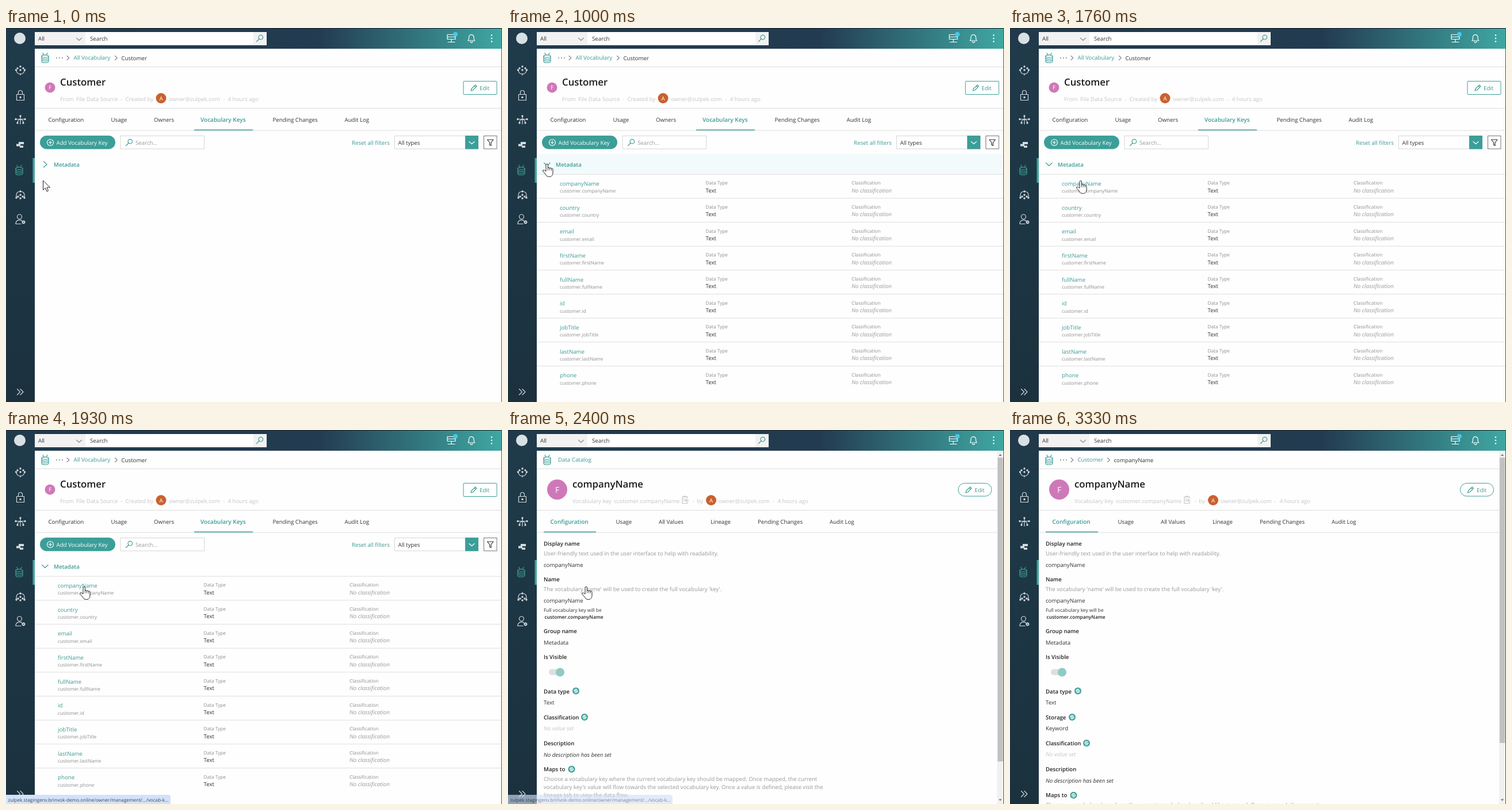
An HTML page that plays this animation: 862 px wide and 650 px high, repeating every 4.86 s.

```html
<!DOCTYPE html>
<html lang="en">
<head>
<meta charset="utf-8">
<title>Vocabulary keys</title>
<style>
html, body { margin: 0; width: 100%; height: 100%; overflow: hidden; background: #fefefe; }
svg { display: block; }
text { font: 9.7px "Open Sans", "Noto Sans", sans-serif; fill: #333; text-rendering: geometricPrecision; }
.title { font-size: 16.8px; font-weight: 600; fill: #1c1c1c; }
.label { font-size: 9.65px; font-weight: 600; fill: #222; }
.tab { font-size: 10px; font-weight: 600; fill: #3c9a94; }
.link { fill: #3c9a94; }
.faint { fill: #c6c6c6; }
.hint { fill: #999; }
.small { font-size: 8.25px; fill: #8c8c8c; }
.it { font-style: italic; }
.white { fill: #fff; }
.mid { text-anchor: middle; }
.rule { stroke: #dedede; }
.teal { stroke: #3c9e98; }
.ln { fill: none; stroke-width: 1.2; stroke-linecap: round; stroke-linejoin: round; }
.pale { stroke: #d3dade; }
.gray { stroke: #8a8a8a; }

/* scene switches, one 4860 ms loop */
.closed, .rows, .list, .crumb-list, .load, .page, .early, .late, .badge, .hover, .arrow, .hand {
  animation: 4860ms step-end infinite;
}
.closed { animation-name: closed; }
.rows { animation-name: rows; }
.list { animation-name: list; }
.crumb-list { animation-name: crumb; }
.load { animation-name: load; }
.page { animation-name: page; }
.early { animation-name: early; }
.late { animation-name: late; }
.badge { animation-name: badge; }
.hover { animation-name: hover; }
.arrow { animation-name: arrow; }
.hand { animation-name: hand; }
@keyframes closed { 0% { visibility: visible } 20.576%, 100% { visibility: hidden } }
@keyframes rows { 0% { visibility: hidden } 20.576% { visibility: visible } 44.444%, 100% { visibility: hidden } }
@keyframes list { 0% { visibility: visible } 44.444%, 100% { visibility: hidden } }
@keyframes crumb { 0% { visibility: visible } 49.177%, 100% { visibility: hidden } }
@keyframes load { 0% { visibility: hidden } 44.444% { visibility: visible } 49.177%, 100% { visibility: hidden } }
@keyframes page { 0% { visibility: hidden } 49.177%, 100% { visibility: visible } }
@keyframes early { 0% { visibility: hidden } 49.177% { visibility: visible } 50.72%, 100% { visibility: hidden } }
@keyframes late { 0% { visibility: hidden } 50.72%, 100% { visibility: visible } }
@keyframes badge { 0% { visibility: visible } 44.444% { visibility: hidden } 49.177%, 100% { visibility: visible } }
@keyframes hover { 0% { visibility: hidden } 14.4% { visibility: visible } 34.3%, 100% { visibility: hidden } }
@keyframes arrow { 0% { visibility: visible } 12.963%, 100% { visibility: hidden } }
@keyframes hand { 0% { visibility: hidden } 12.963% { visibility: visible } 68.519%, 100% { visibility: hidden } }

.move { animation: move 4860ms cubic-bezier(.25, .46, .45, .94) infinite; }
@keyframes move {
  0%, 12.963% { transform: translate(65px, 264.5px) }
  17.695%, 32.099% { transform: translate(68px, 236px) }
  39.712%, 100% { transform: translate(136px, 272px) }
}
.status { animation: status 4860ms linear infinite; }
@keyframes status {
  0%, 38.68% { opacity: 0 }
  38.69%, 47.94% { opacity: 1 }
  52.058%, 100% { opacity: 0 }
}
.spoke { stroke: #47a296; stroke-width: 6; stroke-linecap: round; animation: spoke 1215ms linear infinite; }
@keyframes spoke { from { opacity: 1 } to { opacity: 0 } }
</style>
</head>
<body>
<svg width="862" height="650" viewBox="0 0 862 650">
  <defs>
    <linearGradient id="bar" gradientUnits="userSpaceOnUse" x1="0" x2="862" y1="0" y2="0">
      <stop offset="0" stop-color="#203a4b"/>
      <stop offset=".63" stop-color="#233b50"/>
      <stop offset="1" stop-color="#3fa8a3"/>
    </linearGradient>
    <linearGradient id="side" x1="0" x2="0" y1="0" y2="1">
      <stop offset="0" stop-color="#1f3a49"/>
      <stop offset="1" stop-color="#1b313e"/>
    </linearGradient>
    <g id="stack" class="ln teal">
      <ellipse cy="-3" rx="6" ry="2.2"/>
      <path d="M-6-3V6c0 3 12 3 12 0V-3M-6 0c0 3 12 3 12 0M-6 3c0 3 12 3 12 0M-2.5-5.5-4-8.5M2.5-5.5 4-8.5"/>
    </g>
    <g id="lens" class="ln">
      <circle cx="1.8" cy="-1.8" r="3.8"/><path d="M-1 1-5.5 5.5"/>
    </g>
    <path id="pencil" class="ln teal" d="M-5 5-4 1.5 2.7-5 5-2.7-1.5 4zM1-3.3 3.3-1"/>
    <path id="next" class="ln gray" d="M-2-3.5 1.8 0-2 3.5"/>
    <g id="more" fill="#777"><circle cx="-5" r=".9"/><circle r=".9"/><circle cx="5" r=".9"/></g>
    <g id="info">
      <circle r="6" fill="#3c9e98"/>
      <g class="ln" stroke="#fff" stroke-width=".9"><circle r="1.3"/><path d="M-3 1A3.2 3.2 0 0 1 2-2.5M3-1A3.2 3.2 0 0 1-2 2.5"/></g>
    </g>
  </defs>

  <rect width="862" height="650" fill="#fefefe"/>
  <rect y="36" width="50" height="614" fill="url(#side)"/>
  <rect width="862" height="36" fill="url(#bar)"/>

  <!-- top bar -->
  <circle cx="24" cy="18" r="10" fill="#d9e0e4"/>
  <rect x="50" y="7" width="403" height="23" fill="#f2f2f2"/>
  <rect x="138" y="7" width="292" height="23" fill="#fff"/>
  <text x="56" y="21.5" fill="#555">All</text>
  <path class="ln gray" d="M122.500 17.500l4.500 4 4.500-4"/>
  <text x="146" y="22">Search</text>
  <use href="#lens" x="441" y="18" class="teal"/>
  <g class="ln" stroke="#fff">
    <path d="M767 11.500h14v4h-14zM767 15.500h14v4h-14zM774 19.500v4M768 24.500h12"/>
    <path d="M803 22c2-2 1.500-4 1.500-6a4.300 4.300 0 0 1 8.600 0c0 2-.4 4 1.600 6zM807 23.500a2 1.800 0 0 0 4 0"/>
  </g>
  <circle class="badge" cx="781" cy="11" r="4" fill="#45c8ea"/>
  <g fill="#fff"><circle cx="844" cy="12.500" r="1.300"/><circle cx="844" cy="18" r="1.300"/><circle cx="844" cy="23.500" r="1.300"/></g>

  <!-- side bar -->
  <g class="ln pale">
    <path d="M18 74c1 8 13 8 14 0M25 79v3"/>
    <path d="M18.500 115.500h13v10h-13zM21.500 115v-3a3.500 3.500 0 0 1 7 0v3"/>
    <path d="M17 158.500h16M25 153v14M20 165c0-4 2-6 5-6s5 2 5 6"/>
    <path d="M18 290c0-8 14-8 14 0M18 290v4M32 290v4"/>
    <circle cx="23.500" cy="328" r="4"/>
    <path d="M17 340.500c0-8 9-8 11-5M17 340.500h9"/>
    <circle cx="30.500" cy="337.500" r="2" stroke-width="2" stroke-dasharray="1.200 .6"/>
    <path d="M19.500 627.500l5 5-5 5M25 627.500l5 5-5 5"/>
  </g>
  <g id="dots" fill="#d3dade"></g>
  <path d="M22 198h9v4h-9zM18 201.500h7v4h-7zM24 204.500h6v3.500h-6z" fill="#d3dade"/>
  <use href="#stack" x="23" y="247"/>
  <rect x="46.500" y="226" width="3.500" height="43" fill="#3fa59f"/>

  <path class="rule" d="M50 67.500H861"/>
  <use href="#stack" x="68" y="52"/>

  <g class="crumb-list">
    <use href="#more" x="93" y="52"/>
    <use href="#next" x="108" y="52"/>
    <text class="link" x="117.500" y="55">All Vocabulary</text>
    <use href="#next" x="191.500" y="52"/>
    <text x="200.500" y="55.500">Customer</text>
  </g>

  <!-- vocabulary with its keys -->
  <g class="list">
    <circle cx="76.500" cy="103.500" r="9" fill="#cf78b9"/>
    <text class="white mid" x="76.500" y="107.300">F</text>
    <text class="title" x="94" y="100">Customer</text>
    <g class="meta">
      <text class="faint" x="94" y="126.500">From</text>
      <text class="faint" x="122" y="126.500">File Data Source</text>
      <text class="faint" x="199" y="126.500">-</text>
      <text class="faint" x="207.500" y="126.500">Created by</text>
      <circle cx="269.500" cy="122" r="9" fill="#c9612f"/>
      <text class="white mid" x="269.500" y="126">A</text>
      <text class="faint" x="283" y="126.500">owner@zulpek.com</text>
      <text class="faint" x="377.500" y="126.500">-</text>
      <text class="faint" x="385.500" y="126.500">4 hours ago</text>
    </g>
    <rect x="795" y="92.500" width="58" height="23" rx="1" fill="#fff" class="teal"/>
    <use href="#pencil" x="813" y="104"/>
    <text class="link" x="823" y="107.800">Edit</text>
    <path class="rule" d="M50 139.500H861M50 178H861"/>
    <text x="73.500" y="163">Configuration</text>
    <text x="182.500" y="163">Usage</text>
    <text x="257" y="163">Owners</text>
    <text class="tab" x="338" y="163">Vocabulary Keys</text>
    <text x="463.500" y="163">Pending Changes</text>
    <text x="588.500" y="163">Audit Log</text>
    <path class="teal" stroke-width="1.500" d="M327 177.300H429"/>

    <rect x="59" y="187" width="131" height="23.500" rx="11.700" fill="#3c9e98"/>
    <g class="ln" stroke="#fff"><circle cx="77" cy="199" r="5.500"/><path d="M74.200 199h5.600M77 196.200v5.600"/></g>
    <text class="white" x="87.500" y="202.500">Add Vocabulary Key</text>
    <rect x="199" y="187.500" width="145.500" height="22.500" fill="#fff" stroke="#d6d6d6"/>
    <use href="#lens" x="214" y="199" class="teal"/>
    <text class="hint" x="225" y="202.500">Search...</text>
    <text class="link" x="601" y="202.500">Reset all filters</text>
    <rect x="675.500" y="187.500" width="145" height="22.500" fill="#fff" stroke="#d6d6d6"/>
    <text x="681.500" y="203">All types</text>
    <rect x="798" y="187" width="23" height="23.500" fill="#3c9e98"/>
    <path class="ln" stroke="#fff" d="M805 197.500l4.500 4 4.500-4"/>
    <rect x="830.500" y="187.500" width="22.500" height="22.500" fill="#fff" stroke="#777"/>
    <path class="ln" stroke="#333" d="M836.500 194h10.500l-4 5v5.500l-2.500-1.500v-4z"/>

    <rect class="hover" x="50" y="219" width="811" height="35" fill="#f3fafb"/>
    <path class="closed ln teal" stroke-width="1.500" d="M65.500 232l5.500 5-5.500 5"/>
    <path class="rows ln teal" stroke-width="1.500" d="M62.500 234.500l5.300 5 5.300-5"/>
    <text class="label link" style="fill:#3c9a94" x="83" y="241">Metadata</text>
  </g>
  <g class="rows" id="rows"></g>

  <!-- loading -->
  <g class="load">
    <rect x="50" y="68" width="811" height="582" fill="#f3f3f3"/>
    <g id="spinner" transform="translate(456.500 141)"></g>
    <text class="small" style="fill:#666" x="424.500" y="223.500">Fetching data</text>
  </g>

  <!-- key details -->
  <g class="page">
    <circle cx="85.500" cy="103.500" r="17.500" fill="#cf78b9"/>
    <text class="white mid" style="font-size:14px" x="85.500" y="109">F</text>
    <text class="title" x="112" y="100">companyName</text>
    <text class="faint" x="112" y="126.500">Vocabulary key</text>
    <text class="faint" x="184" y="126.500">customer.companyName</text>
    <path class="ln" stroke="#c6c6c6" d="M312 119v-3h-9v11.500h9v-2M305.500 117v-2h4v2M305 120h4M305 123h3M314 122.500h-5M311 120.500l-2 2 2 2"/>
    <text class="faint" x="321" y="126.500">-</text>
    <text class="faint" x="328.500" y="126.500">by</text>
    <circle cx="353" cy="122" r="9" fill="#c9612f"/>
    <text class="white mid" x="353" y="126">A</text>
    <text class="faint" x="366" y="126.500">owner@zulpek.com</text>
    <text class="faint" x="460" y="126.500">-</text>
    <text class="faint" x="468.500" y="126.500">4 hours ago</text>
    <rect x="782.500" y="92.500" width="58" height="22.500" rx="11.200" fill="#fff" class="teal"/>
    <use href="#pencil" x="800.500" y="104"/>
    <text class="link" x="811" y="107.800">Edit</text>
    <path class="rule" d="M50 139.500H850M50 178H850"/>
    <text class="tab" x="73.500" y="163">Configuration</text>
    <text x="187.500" y="163">Usage</text>
    <text x="262" y="163">All Values</text>
    <text x="352" y="163">Lineage</text>
    <text x="434" y="163">Pending Changes</text>
    <text x="559" y="163">Audit Log</text>
    <path class="teal" stroke-width="1.500" d="M62 177.300H153"/>

    <text class="label" x="62" y="201">Display name</text>
    <text class="hint" x="62" y="217.500">User-friendly text used in the user interface to help with readability.</text>
    <text x="62" y="237.500">companyName</text>
    <text class="label" x="62" y="263">Name</text>
    <text class="hint" x="62" y="279.500">The vocabulary 'name' will be used to create the full vocabulary 'key'.</text>
    <text x="62" y="299.500">companyName</text>
    <text style="font-size:8.400px" x="62" y="316">Full vocabulary key will be</text>
    <text class="label" style="font-size:8.400px" x="63.500" y="328">customer.companyName</text>
    <text class="label" x="62" y="353">Group name</text>
    <text x="62" y="372.500">Metadata</text>
    <text class="label" x="62" y="398">Is Visible</text>
    <rect x="71" y="415.500" width="26" height="10.500" rx="5.200" fill="#dedede"/>
    <circle cx="90.500" cy="421" r="7.500" fill="#8ecac6"/>
    <text class="label" x="62" y="457.500">Data type</text>
    <use href="#info" x="118" y="453.500"/>
    <text x="62" y="477">Text</text>

    <rect x="850" y="36" width="11" height="614" fill="#f1f1f1"/>
    <path d="M852.800 45h5.400l-2.700-3.200zM852.800 641.500h5.400l-2.700 3.200z" fill="#777"/>
  </g>
  <g class="early">
    <text class="link" x="87" y="55">Data Catalog</text>
    <rect x="851" y="48" width="9.500" height="528" fill="#c1c1c1"/>
    <g class="tail"></g>
  </g>
  <g class="late">
    <use href="#more" x="93" y="52"/>
    <use href="#next" x="108" y="52"/>
    <text class="link" x="117.500" y="55">Customer</text>
    <use href="#next" x="171.500" y="52"/>
    <text x="180.500" y="55.500">companyName</text>
    <rect x="851" y="48" width="9.500" height="496" fill="#c1c1c1"/>
    <text class="label" x="62" y="502.500">Storage</text>
    <use href="#info" x="108" y="499"/>
    <text x="62" y="522">Keyword</text>
    <g class="tail" transform="translate(0 45.300)"></g>
  </g>

  <g class="status">
    <path d="M0 634H282q4 0 4 4V650H0z" fill="#d3e2fb"/>
    <text style="font-size:8.200px;fill:#444" x="3.500" y="645.500">zulpek.stagingenv.brinvok-demo.online/owner/management/.../vocab-k...</text>
  </g>

  <path d="M0 .5H862" stroke="#16202a"/>
  <path d="M861.500 0V650" stroke="#4a5357"/>

  <path class="arrow" transform="translate(64.500 265)" d="M0 0V16.500l3.800-3.500 2.600 6 2.600-1.100-2.600-5.800H12z" fill="#fff" stroke="#222"/>
  <g class="hand"><g class="move">
    <path d="M-2 13V2a1.700 1.700 0 0 1 3.400 0V8a1.500 1.500 0 0 1 3 0v.6a1.500 1.500 0 0 1 3 0v.8a1.300 1.300 0 0 1 2.600 0V15c0 5-2.300 7.500-6.500 7.500-4 0-5-2-6.500-4.500L-7.300 13c-1-1.700 1.200-3 2.500-1.600z" fill="#fff" stroke="#222" stroke-linejoin="round"/>
    <path d="M1.400 8v3.500M4.400 8.600v3M7.400 9.400v2.400" stroke="#222" stroke-width=".8"/>
  </g></g>
</svg>
<script>
const $ = s => document.querySelector(s);
const text = (x, y, cls, s) => `<text x="${x}" y="${y}" class="${cls}">${s}</text>`;

const keys = ['companyName', 'country', 'email', 'firstName', 'fullName', 'id', 'jobTitle', 'lastName', 'phone'];
$('#rows').innerHTML = keys.map((key, i) => {
  const y = 254.3 + i * 41.65;
  return `<path class="rule" d="M50 ${y}H861"/>` +
    text(90, y + 19.7, 'link', key) +
    text(90, y + 32, 'small', 'customer.' + key) +
    text(343.5, y + 18, 'small', 'Data Type') +
    text(343.5, y + 31.5, '', 'Text') +
    text(597, y + 18, 'small', 'Classification') +
    text(597, y + 31.5, 'it hint', 'No classification');
}).join('');

const tail =
  text(62, 502.5, 'label', 'Classification') + '<use href="#info" x="133" y="499"/>' +
  text(62, 522, 'it faint', 'No value set') +
  text(62, 548, 'label', 'Description') +
  text(62, 567.5, 'it', 'No description has been set') +
  text(62, 593, 'label', 'Maps to') + '<use href="#info" x="110.500" y="589.500"/>' +
  ['Choose a vocabulary key where the current vocabulary key should be mapped. Once mapped, the current',
   'vocabulary key\'s value will flow towards the selected vocabulary key. Once a value is defined, please visit the',
   'lineage tab to view the data flow.'].map((s, i) => text(62, 610 + i * 14, 'hint', s)).join('');
document.querySelectorAll('.tail').forEach(g => g.innerHTML = tail);

// each spoke lights up in turn, clockwise
$('#spinner').innerHTML = Array.from({ length: 8 }, (_, i) =>
  `<path class="spoke" d="M0-18V-41" transform="rotate(${i * 45})" style="animation-delay:${i * 151.875 - 1485}ms"/>`).join('');

const dots = [[25, 67], [20, 70], [30, 70], [25, 73], [17.5, 73], [32.5, 73], [25, 120.5], [17, 158.5], [33, 158.5],
  [25, 153], [20, 165], [30, 165], [25, 284], [25, 290], [21, 293], [29, 293], [18, 295], [32, 295], [25, 296]];
$('#dots').innerHTML = dots.map(([x, y]) => `<circle cx="${x}" cy="${y}" r="1.700"/>`).join('');
</script>
</body>
</html>
```
